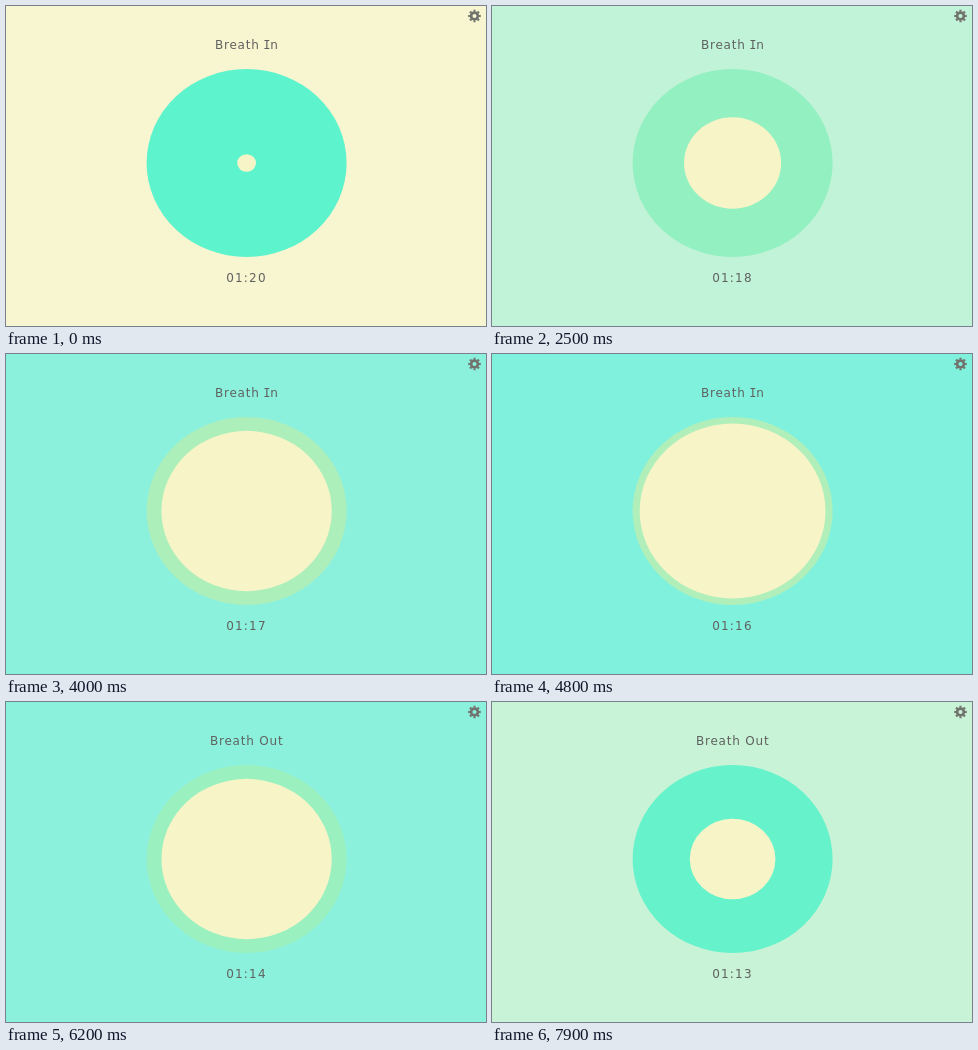
These frames come from a looping animation (480 px wide and 320 px high, 8 s). An HTML page:

```html
<!DOCTYPE html>
<html lang="en">
<head>
<meta charset="utf-8">
<title>Breathing timer</title>
<style>
  html, body { margin: 0; width: 100%; height: 100%; overflow: hidden; }
  svg { display: block; width: 480px; height: 320px; }
  text { font: 12px "DejaVu Sans", Verdana, sans-serif; fill: #606260; text-anchor: middle; letter-spacing: .8px; }
  .serif-i { font-family: "DejaVu Sans Mono", monospace; }
  #timer { letter-spacing: 1.2px; }
  .gear circle { fill: none; stroke: #71736d; }
</style>
</head>
<body>
<svg id="stage" viewBox="0 0 480 320">
  <rect id="back" width="480" height="320"/>
  <ellipse id="ring" cx="240.6" cy="157" rx="100" ry="94"/>
  <ellipse id="core" cx="240.6" cy="157" fill="#f7f4c8"/>
  <text id="in" x="240.8" y="43">Breath <tspan class="serif-i" dx="-1">I</tspan><tspan dx="-1">n</tspan></text>
  <text id="out" x="240.7" y="43">Breath Out</text>
  <text id="timer" x="240.5" y="276"></text>
  <g class="gear" transform="translate(468.5 10)">
    <circle r="3.4" stroke-width="2.7"/>
    <circle r="5.3" stroke-width="2" pathLength="16" stroke-dasharray="1 1" stroke-dashoffset=".5"/>
  </g>
</svg>
<script>
const LOOP = 8000, STEP = 100;
const FIRST = 100, BREATH = 5000, TURN = FIRST + BREATH;
const SAND = [248, 245, 209], AQUA = [127, 241, 221];
const MINT = [93, 243, 205], LIME = [178, 239, 185];
// Ring tint: time, share of lime
const TINT = [[0, 0], [100, 0], [700, .09], [1600, .32], [2500, .635], [3300, .83],
              [4000, .94], [4800, .98], [5100, 1], [5600, .91], [6200, .72],
              [7000, .36], [7900, .11], [8000, .09]];

const $ = id => document.getElementById(id);
const back = $("back"), ring = $("ring"), core = $("core"), timer = $("timer");
const labelIn = $("in"), labelOut = $("out");

const mix = (a, b, k) => a + (b - a) * k;
const blend = (a, b, k) => `rgb(${a.map((v, i) => Math.round(mix(v, b[i], k)))})`;

// cubic-bezier(.42, 0, .58, 1)
function easeInOut(u) {
  if (u <= 0) return 0;
  if (u >= 1) return 1;
  let lo = 0, hi = 1;
  for (let i = 0; i < 24; i++) {
    const s = (lo + hi) / 2;
    if (1.26 * s - .78 * s * s + .52 * s ** 3 < u) lo = s; else hi = s;
  }
  return lo * lo * (3 - 2 * lo);
}

function tintAt(t) {
  const i = TINT.findIndex(([end]) => t < end);
  const [t0, v0] = TINT[i - 1], [t1, v1] = TINT[i];
  return mix(v0, v1, (t - t0) / (t1 - t0));
}

function draw(t) {
  const inhaling = t < TURN;
  const grow = inhaling
    ? easeInOut((t - FIRST) / BREATH)
    : 1 - easeInOut((t - TURN) / BREATH);
  back.setAttribute("fill", blend(SAND, AQUA, grow));
  ring.setAttribute("fill", blend(MINT, LIME, tintAt(t)));
  core.setAttribute("rx", mix(9.4, 93.5, grow));
  core.setAttribute("ry", mix(8.8, 88, grow));
  labelIn.style.display = inhaling ? "" : "none";
  labelOut.style.display = inhaling ? "none" : "";
  const left = 80 - Math.max(0, Math.floor((t - FIRST) / 1000));
  const pad = n => String(n).padStart(2, "0");
  timer.textContent = `${pad(Math.floor(left / 60))}:${pad(left % 60)}`;
}

const start = performance.now();
function tick() {
  const t = (performance.now() - start) % LOOP;
  draw(Math.floor(t / STEP) * STEP);
  requestAnimationFrame(tick);
}
tick();
</script>
</body>
</html>
```
